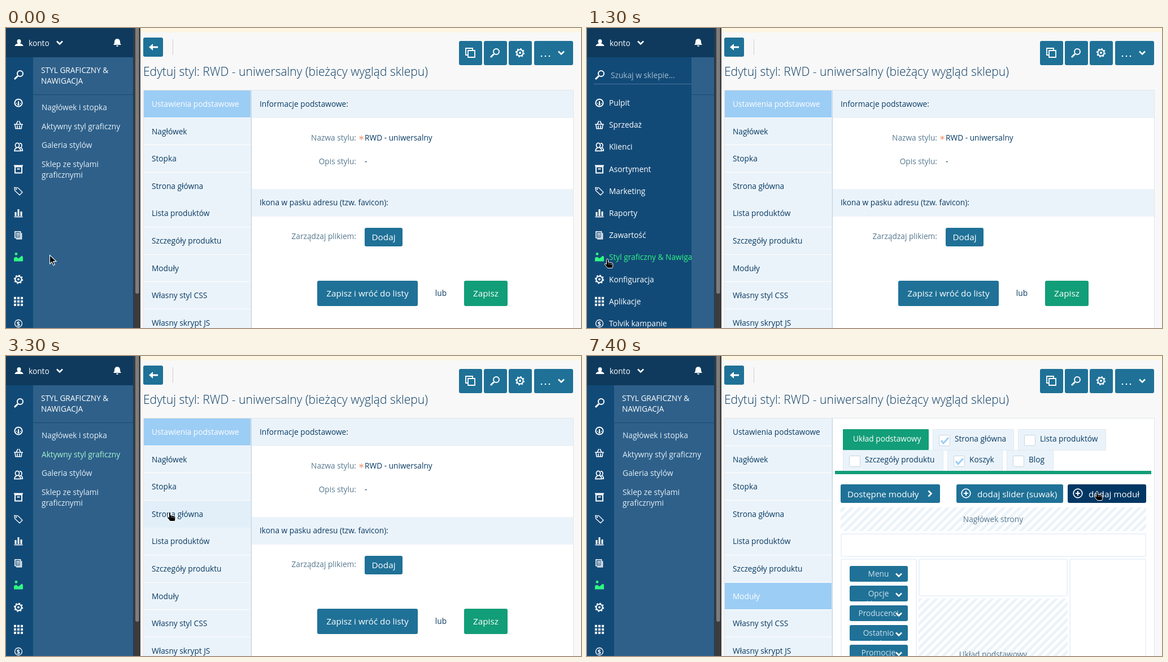
Recreate the animation shown at these times as an HTML page. Size 1018 by 533 pixels, loop 8 s.

```html
<!DOCTYPE html>
<html lang="pl">
<head>
<meta charset="utf-8">
<title>Panel sklepu</title>
<style>
  html, body { margin: 0; width: 100%; height: 100%; overflow: hidden; }
  svg { display: block; }
  #stage { width: 100vw; height: 100vh; font: 13.7px "Open Sans", "Noto Sans", sans-serif; }
  .line { fill: none; stroke: #fff; stroke-width: 2; }
</style>
</head>
<body>
<svg id="stage" viewBox="0 0 1018 533"></svg>
<script>
const NAVY = '#073a62', BLUE = '#1f7197', GREEN = '#129e78', LIME = '#2ff782';
const PALE = '#ebf3fa', SKY = '#9ccdf5', MUTED = '#56788f', SIDE = '#124a77';
const LOOP = 8000;

const rect = (x, y, w, h, fill, more = '') =>
  `<rect x="${x}" y="${y}" width="${w}" height="${h}" fill="${fill}" ${more}/>`;
const text = (x, mid, label, fill = NAVY, more = '') =>
  `<text x="${x}" y="${mid + 5}" fill="${fill}" ${more}>${label}</text>`;
const at = (x, y, inner) => `<g transform="translate(${x} ${y})">${inner}</g>`;
const line = (d, style = '') => `<path class="line" d="${d}" style="${style}"/>`;
const thick = (d, width) => line(d, `stroke-width:${width}`);
const solid = (d, fill = '#fff') => `<path d="${d}" fill="${fill}"/>`;
const ring = (r, style = '') => `<circle class="line" r="${r}" style="${style}"/>`;
const dot = (x, y, r, fill = '#fff') => `<circle cx="${x}" cy="${y}" r="${r}" fill="${fill}"/>`;
const each = (list, draw) => list.map(draw).join('');
const button = (x, y, w, h, fill = BLUE, more = '') => rect(x, y, w, h, fill, 'rx="3" ' + more);
const END = 'text-anchor="end"', MIDDLE = 'text-anchor="middle"', BIG = 'font-size="15.25"';
const BIG_MIDDLE = `${BIG} ${MIDDLE}`;

const lens = thick('M-2.2 2.2L-8 8', 3) + at(2, -2, ring(5));
const chevron = thick('M-5-2.5L0 2.5L5-2.5', 2.6);
const gear = ring(5.6) + ring(7, 'stroke-width:2.2;stroke-dasharray:2.7 2.8') + dot(0, 0, 2);
const plus = ring(7.8, 'stroke-width:1.7') + line('M-4 0H4M0-4V4');

const icons = [
  ring(6.6) + line('M0 4V-3M-4 1H-3M3 1H4') + dot(0, 3, 1.8),
  thick('M-8-1H8M-6 0L-5 6.5H5L6 0M-4-1L-1-7M4-1L1-7M-2 1V6M2 1V6', 1.6),
  thick('M-2-7a3.3 3.7 0 0 1 0 8q-4.5 1-5 6H4q-.5-5-4.2-6M-2-7a3.3 3.7 0 0 0 0 8M2-6.5q4-.5 4 3.5 0 3-2 4 3 1 3.3 5.5H5', 1.7),
  line('M-6-4V7H6V-4ZM-8-6H8M-2.5 0H2.5'),
  thick('M-7-6.5L-1-6L7 2L2 7L-6.5-1Z', 1.3) + dot(-4, -3.5, 1.2),
  thick('M-5-2V5M0-7V5M5-3V5', 3) + thick('M-7.5 6.5H7.5', 1.6),
  thick('M-6-6.5H3.5V4.5H-6ZM5.5-4V6.5H-4M-4-3.5H2M-4-1H2M-4 1.5H2', 1.6),
  dot(-4, -6, 2.4, LIME) + solid('M-8 7V1L-4-1L0 2L6-3L8-1V7Z', LIME),
  gear,
  each([...Array(9).keys()], i => rect(-8 + i % 3 * 6, -8 + Math.floor(i / 3) * 6, 4, 4, '#fff')),
  ring(6.5, 'stroke-width:1.3') + `<text y="4" ${MIDDLE} font-size="11" font-weight="700" fill="#fff">$</text>`,
];
const menu = ['Pulpit', 'Sprzedaż', 'Klienci', 'Asortyment', 'Marketing', 'Raporty', 'Zawartość',
  'Styl graficzny &amp; Nawigacja', 'Konfiguracja', 'Aplikacje', 'Tolvik kampanie'];
const tabs = ['Ustawienia podstawowe', 'Nagłówek', 'Stopka', 'Strona główna', 'Lista produktów',
  'Szczegóły produktu', 'Moduły', 'Własny styl CSS', 'Własny skrypt JS'];
const TAB_STEP = 48.6;
const rowY = i => 133 + 39.2 * i;
const tabY = i => 111 + TAB_STEP * i;

const sidebar = rect(0, 0, 226, 533, '#2e608a')
  + rect(48, 118, 177, 1, '#174970')
  + `<g id="submenu">`
  + text(62, 75, 'STYL GRAFICZNY &amp;', '#fff') + text(62, 94, 'NAWIGACJA', '#fff')
  + text(63, 141, 'Nagłówek i stopka', '#e6eff6')
  + `<g id="active">${text(63, 175, 'Aktywny styl graficzny', 'inherit')}</g>`
  + `<g id="gallery">${text(63, 208, 'Galeria stylów', 'inherit')}</g>`
  + `<g id="shop">${text(63, 242, 'Sklep ze stylami', 'inherit')}${text(63, 261, 'graficznymi', 'inherit')}</g></g>`
  + rect(0, 52, 48, 481, SIDE)
  + `<svg id="menu" y="52" height="481"><g transform="translate(0 -52)">`
  + rect(0, 52, 226, 481, SIDE)
  + text(42, 84, 'Szukaj w sklepie...', '#a3bace') + rect(12, 99, 202, 1, '#4c769a')
  + each(menu, (m, i) => text(39, rowY(i), m, i === 7 ? LIME : '#fff')) + '</g></svg>'
  + at(23, 83, lens)
  + each(icons, (icon, i) => at(22, rowY(i), icon))
  + rect(0, 0, 226, 52, '#0f3a5d')
  + at(23, 26, solid('M0-6q3.5 0 3.5 4 0 2-1.5 3.5 5.5 1.5 5.5 4.5H-7.5q0-3 5.5-4.5-1.5-1.5-1.5-3.5 0-4 3.5-4Z'))
  + text(40, 26.5, 'konto', '#fff') + at(95, 26, chevron)
  + at(197, 26, solid('M0-7q5 .5 5 6 0 3.5 2 5H-7q2-1.5 2-5 0-5.5 5-6ZM-2 5H2q0 2-2 2t-2-2Z'))
  + rect(225, 0, 1, 533, '#103d61')
  + rect(226, 0, 12, 533, '#3b3b3b') + rect(229, -6, 6.5, 478, '#7d7d7d', 'rx="3"');

const topbar = rect(238, 0, 780, 533, '#f8f8f8') + rect(238, 0, 780, 7.5, '#fef6e0')
  + button(243, 17, 35, 34) + at(261, 34, thick('M-6 0H8', 3) + solid('M-8 0L-1-6V6Z'))
  + rect(295, 20, 1, 28, '#cfcfcf')
  + text(243, 79.5, 'Edytuj styl: RWD - uniwersalny (bieżący wygląd sklepu)', NAVY, 'font-size="21.05" font-weight="300"')
  + each([802, 846, 890], x => button(x, 23, 41, 43)) + button(935, 23, 69, 43)
  + at(822, 44, thick('M-8-8H4V4H-8ZM-4-4H8V8H-4Z', 1.8) + rect(-3, -3, 10, 10, BLUE))
  + at(866, 44, lens) + at(910, 44, gear)
  + each([948, 955, 962], x => dot(x, 50, 1.3))
  + at(983, 44, chevron);

const tabList = rect(243, 110, 762, 424, '#e3e5e7') + rect(244, 111, 760, 423, '#fff')
  + each(tabs, (t, i) => rect(244, tabY(i), 189, 47.8, PALE, `id="tab${i}" shape-rendering="crispEdges"`)
    + text(258, 135 + TAB_STEP * i, t, NAVY, `id="label${i}"`))
  + rect(433, 111, 1, 423, '#e1ebf2') + rect(434, 111, 1, 423, '#bfd3e2');

const settings = rect(435, 111, 569, 49, PALE) + text(449, 135, 'Informacje podstawowe:')
  + text(620, 195, 'Nazwa stylu:', MUTED, END)
  + at(629, 195, line('M0-4V4M-3.6-2L3.6 2M-3.6 2L3.6-2', 'stroke:#f79a70;stroke-width:1.2'))
  + text(635, 195, 'RWD - uniwersalny') + text(620, 237, 'Opis stylu:', MUTED, END) + text(635, 237, '-')
  + rect(435, 286, 569, 49, PALE) + text(449, 310, 'Ikona w pasku adresu (tzw. favicon):')
  + text(620, 370, 'Zarządzaj plikiem:', MUTED, END)
  + button(635, 355, 67, 33) + text(668.5, 371.5, 'Dodaj', '#fff', BIG_MIDDLE)
  + button(551, 449, 178, 45) + text(640, 472, 'Zapisz i wróć do listy', '#fff', BIG_MIDDLE)
  + text(770, 471, 'lub', NAVY, MIDDLE)
  + button(811, 449, 77, 45, GREEN) + text(849.5, 472, 'Zapisz', '#fff', BIG_MIDDLE);

const pageTab = ([x, y, w, label, checked]) =>
  rect(x + .5, y + .5, w - 1, 37, PALE, 'stroke="#dfe9f1"')
  + rect(x + 11.5, y + 10.5, 19, 19, '#fff', 'rx="2" stroke="#c3d5e3"')
  + (checked ? at(x + 21, y + 20, line('M-6 0L-2 5L7-5', `stroke:${SKY};stroke-width:3`)) : '')
  + text(x + 39, y + 17, label);
const moduleButton = ([label, next = ''], i) => {
  const y = 373 + 35 * i;
  return button(465, y, 103, 28)
    + `<svg x="465" y="${y}" width="103" height="28">${text(51, 14, label, '#cfe1ec', MIDDLE)}${text(51, 33, next, '#cfe1ec', MIDDLE)}</svg>`
    + at(552, y + 16, chevron);
};
const frame = (x, y, w, h) => rect(x, y, w, h, '#fff', `rx="2" stroke="${PALE}" stroke-width="2"`);

const modules = rect(435, 111, 569, 422, '#fff')
  + rect(453, 130, 152, 37, GREEN, 'rx="1"') + text(471, 147, 'Układ podstawowy', '#fff')
  + each([[612, 130, 144, 'Strona główna', true], [763, 130, 156, 'Lista produktów'],
    [453, 167, 178, 'Szczegóły produktu'], [638, 167, 98, 'Koszyk', true], [743, 167, 83, 'Blog']], pageTab)
  + rect(439, 204, 560, 6, GREEN)
  + button(449, 228, 176, 33) + text(461, 245.5, 'Dostępne moduły', '#fff', BIG)
  + at(607, 244.5, thick('M-2.5-5L2.5 0L-2.5 5', 2.6))
  + button(654, 228, 189, 33) + at(671, 244, plus) + text(691, 245.5, 'dodaj slider (suwak)', '#fff', BIG)
  + button(851, 228, 139, 33, BLUE, 'id="add"') + at(869, 244, plus) + text(888, 245.5, 'dodaj moduł', '#fff', BIG)
  + rect(449, 269, 541, 42, 'url(#hatch)') + text(719, 290, 'Nagłówek strony', MUTED, MIDDLE)
  + frame(450, 316, 539, 40) + frame(450, 361, 133, 190) + frame(588, 361, 262, 65) + frame(855, 361, 134, 190)
  + rect(587, 431, 264, 102, 'url(#hatch)') + text(719, 530, 'Układ podstawowy', MUTED, MIDDLE)
  + each([['Menu'], ['Opcje', 'klienta'], ['Producenci'], ['Ostatnio', 'oglądane'], ['Promocje']], moduleButton);

const hand = '<path d="M-1.5 1q0-1.8 1.5-1.8t1.5 1.8v4l6.5 1.2q1.8.4 1.8 2v3.3q0 2-1.2 4h-8q-2-2.5-5.3-6.5 0-2.3 2.2-1l1 .9z" stroke="#fff"/>'
  + thick('M2.5 7V9M5 7.5V9.5M7.5 8V10', .7);
const arrow = '<path d="M.5.5V16l3.7-3.4 2.6 6 2.6-1.1-2.6-5.9h5.2z" stroke="#fff" stroke-width="1.1"/>';

const stage = document.getElementById('stage');
stage.innerHTML = `<defs><pattern id="hatch" width="10" height="10" patternUnits="userSpaceOnUse" patternTransform="rotate(45)">
  ${rect(0, 0, 10, 10, '#fff') + rect(0, 0, 5, 10, PALE)}</pattern></defs>`
  + topbar + tabList + `<g id="settings">${settings}</g><g id="modules">${modules}</g>` + sidebar
  + `<g id="cursor"><g id="arrow">${arrow}</g><g id="hand">${hand}</g></g>`;

const el = id => document.getElementById(id);
const set = (id, name, value) => el(id).setAttribute(name, value);
const show = (id, on) => set(id, 'visibility', on ? 'visible' : 'hidden');

// Each key holds until the next one: [time, ...values]
const hold = (keys, t) => keys.findLast(k => k[0] <= t);
const path = [
  [0, 77, 403], [100, 52, 406], [200, 36, 412, 1], [400, 35, 412, 1],
  [1300, 36, 411, 1], [1400, 55, 402], [1500, 85, 392], [1600, 108, 381], [1700, 120, 372],
  [1800, 132, 335], [1900, 143, 295], [2000, 150, 252, 1], [2100, 152, 240, 1],
  [2200, 155, 210, 1], [2300, 158, 190], [2400, 161, 177, 1],
  [3300, 290, 278, 1], [3500, 345, 330, 1], [3600, 368, 372, 1], [3700, 330, 412, 1], [3800, 289, 424, 1], [4000, 292, 429, 1],
  [6400, 438, 417], [6600, 600, 352], [6700, 738, 300],
  [6900, 822, 255], [7000, 872, 222], [7100, 893, 207], [7200, 900, 232, 1], [7400, 903, 241, 1],
];
const menuWidth = [[0, 48], [400, 95], [500, 155], [600, 203], [700, 225], [1300, 185], [1400, 110], [1500, 48]];
const submenuAlpha = [[0, 1], [100, .5], [200, 0], [1500, .35], [1600, .75], [1700, 1]];
const addFill = [[0, BLUE], [7200, '#11547d'], [7400, '#023764']];

function render(t) {
  const [, x, y, pointing] = hold(path, t);
  set('cursor', 'transform', `translate(${x} ${y})`);
  show('hand', pointing);
  show('arrow', !pointing);

  const width = hold(menuWidth, t)[1];
  set('menu', 'width', width);
  show('menu', width > 48);
  set('submenu', 'opacity', hold(submenuAlpha, t)[1]);
  const hover = (id, top, bottom) =>
    set(id, 'fill', pointing && x > 62 && x < 206 && y >= top && y < bottom ? LIME : '#e6eff6');
  hover('active', 167, 184);
  hover('gallery', 200, 217);
  hover('shop', 234, 269);
  if (t >= 3300 && t < 3500) set('active', 'fill', '#a5f4cc');

  const opened = t >= 6100;
  show('settings', !opened);
  show('modules', opened);
  const current = opened ? 6 : 0;
  const over = pointing && x > 243 && x < 434 ? Math.floor((y - 111) / TAB_STEP) : -1;
  tabs.forEach((_, i) => {
    set('tab' + i, 'fill', i === current ? SKY : i === over ? '#e2eff8' : PALE);
    set('label' + i, 'fill', i === current ? '#fff' : NAVY);
  });
  set('add', 'fill', hold(addFill, t)[1]);
}

const start = performance.now();
function tick() {
  render((performance.now() - start) % LOOP);
  requestAnimationFrame(tick);
}
tick();
</script>
</body>
</html>
```
